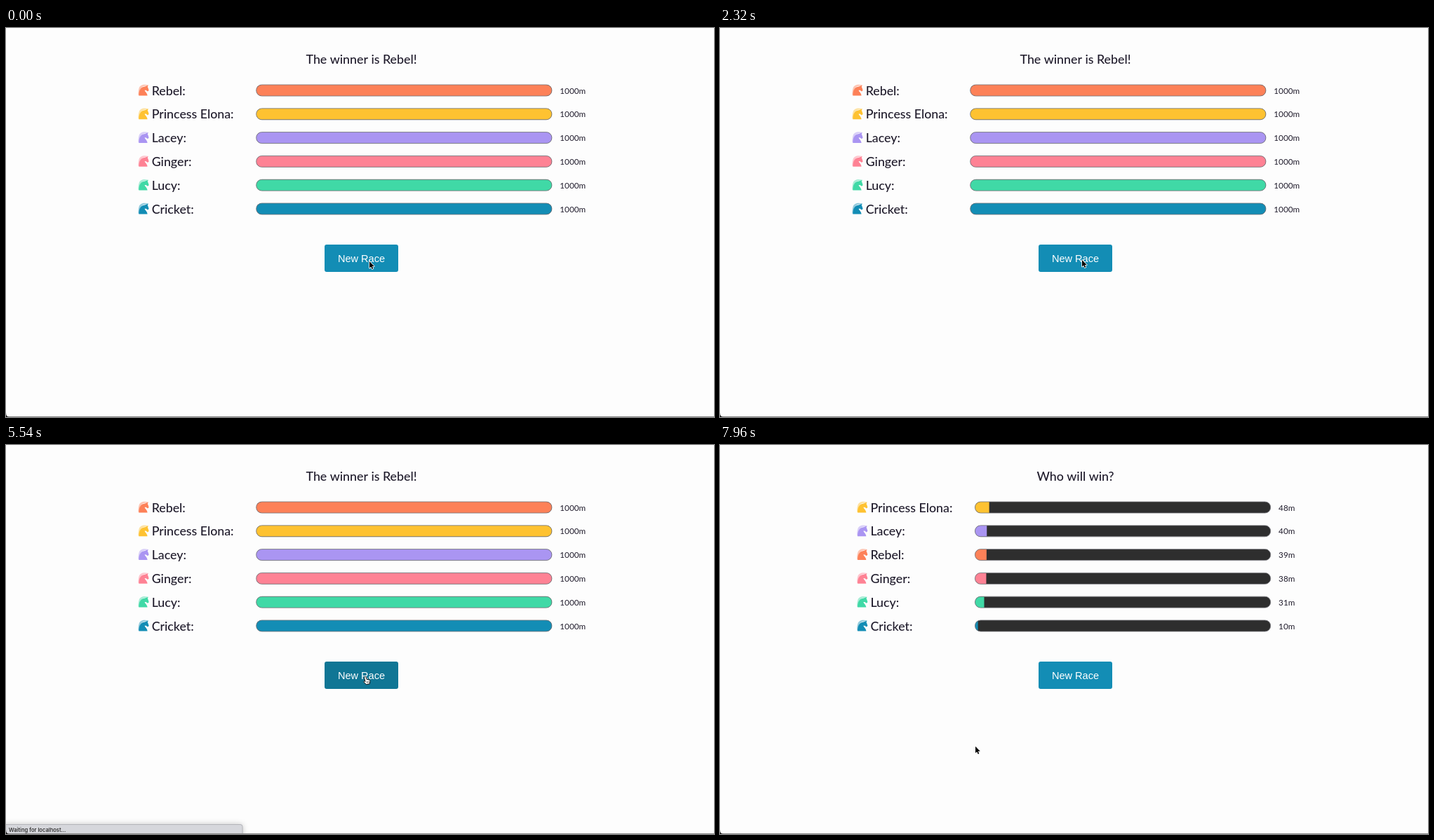
An HTML page with a canvas that plays this animation: 1009x555 px, repeating every 8000 ms.

```html
<!DOCTYPE html>
<html lang="en">
<head>
<meta charset="utf-8">
<title>Horse race</title>
<style>
  html, body { margin: 0; width: 100%; height: 100%; overflow: hidden; background: #fdfdfd; }
  canvas { display: block; }
</style>
</head>
<body>
<canvas id="stage" width="1009" height="555"></canvas>
<script>
const ctx = document.getElementById('stage').getContext('2d');
const LOOP = 8000;
const INK = '#201c2c';
const NAME_FONT = '500 17.8px Lato, sans-serif';
const DIST_FONT = '400 11.7px Lato, sans-serif';
const BUTTON_FONT = '14.5px "Liberation Sans", Arial, sans-serif';
const STATUS_FONT = '500 7.6px Inter, sans-serif';

const TIMES = { hover: 4350, status: 5500, clear: 6000, race: 6500, fade: 6850, leave: 7350 };

const HORSES = {
  'Rebel': '#fd8158',
  'Princess Elona': '#fec231',
  'Lacey': '#aa95f2',
  'Ginger': '#fe8294',
  'Lucy': '#40d9a6',
  'Cricket': '#138db5'
};
const FINISH = Object.keys(HORSES).map(name => [name, 1000]);
const START = [['Princess Elona', 48], ['Lacey', 40], ['Rebel', 39],
               ['Ginger', 38], ['Lucy', 31], ['Cricket', 10]];

// Cursor stops: time, x, y
const PATH = [[0, 518, 333], [300, 516, 331], [4300, 516, 331], [4500, 509, 330],
              [6600, 509, 330], [6900, 507, 333], [7200, 507, 333], [7700, 364, 430]];

const MANE = new Path2D('M15 1C9-1 3 0 1.5 5C.4 8.5 .3 12 .5 15L2.3 15C2 9 4 4 8 2.4Z');
const HEAD = new Path2D('M14.6 .8L13.6 3.2C14.4 4.4 15 6.6 15.5 8.3L13.8 9.9L11.4 8.1' +
  'L9.5 8C10 10.6 13.2 11.7 13.4 15.7L1.2 15.7C1 9 3.4 3.3 9.8 2.7Z');
const ARROW = new Path2D('M0 0L0 9.6L2.2 7.6L3.7 11L5.3 10.3L3.8 7L6.8 7Z');
const HAND = new Path2D('M2 1C3 .1 4 .5 4.3 1.7L5 4.3L8.3 5C9.8 5.3 10 6.2 9.8 7.5' +
  'L9.2 10.8L4.4 11.6L1 8.4C.1 7.4 1.1 6.5 2.2 7.1L3 7.6L1.6 2.4C1.4 1.7 1.5 1.3 2 1Z');
const KNUCKLES = new Path2D('M5 7.2L5.3 9.5M6.6 7.2L6.8 9.4M8.1 7.1L8.1 9.2');

function text(str, x, y, font, color = INK, align = 'left') {
  ctx.font = font;
  ctx.fillStyle = color;
  ctx.textAlign = align;
  ctx.fillText(str, x, y);
}

function roundBox(x, y, w, h, r) {
  ctx.beginPath();
  ctx.roundRect(x, y, w, h, r);
}

function drawIcon(x, y, color) {
  ctx.save();
  ctx.translate(x, y);
  ctx.fillStyle = color;
  ctx.globalAlpha = 0.45;
  ctx.fill(MANE);
  ctx.globalAlpha = 1;
  ctx.fill(HEAD);
  ctx.restore();
}

function drawBar(x, y, w, h, share, color) {
  ctx.save();
  roundBox(x, y, w, h, h / 2);
  ctx.clip();
  ctx.fillStyle = '#2e2e2e';
  ctx.fillRect(x, y, w, h);
  ctx.fillStyle = color;
  ctx.fillRect(x, y, w * share, h);
  ctx.restore();
  roundBox(x, y, w, h, h / 2);
  ctx.strokeStyle = '#727278';
  ctx.lineWidth = 0.8;
  ctx.stroke();
}

function drawRow([name, metres], i) {
  const y = 89 + i * 33.8;
  const label = metres + 'm';
  ctx.font = DIST_FONT;
  // Rows are centred, so a shorter distance moves the whole row right.
  const x = 188 + (37 - ctx.measureText(label).width) / 2;
  drawIcon(x, y - 8.3, HORSES[name]);
  text(name + ':', x + 19.5, y + 6.6, NAME_FONT);
  drawBar(x + 168.5, y - 8, 421.3, 16, metres / 1000, HORSES[name]);
  text(label, x + 601.2, y + 4.5, DIST_FONT);
}

function drawButton(y, hover) {
  roundBox(454, y, 105, 39, 3);
  ctx.fillStyle = hover ? '#107695' : '#138db5';
  ctx.fill();
  text('New Race', 506.5, y + 24.7, BUTTON_FONT, '#fff', 'center');
}

function drawStatus(alpha) {
  if (alpha <= 0) return;
  ctx.save();
  ctx.globalAlpha = alpha;
  ctx.shadowColor = 'rgba(0,0,0,.25)';
  ctx.shadowBlur = 8;
  roundBox(-4, 541.5, 341, 20, 3);
  ctx.fillStyle = '#d6d7dc';
  ctx.fill();
  ctx.shadowColor = 'transparent';
  ctx.strokeStyle = '#b2b3b8';
  ctx.lineWidth = 1;
  ctx.stroke();
  text('Waiting for localhost...', 4, 551.5, STATUS_FONT, '#222');
  ctx.restore();
}

function drawWindowEdge() {
  ctx.fillStyle = '#8b8b8b';
  ctx.fillRect(0, 554, 1009, 1);
  ctx.fillStyle = '#111';
  ctx.fill(new Path2D('M0 549Q0 555 5 555L0 555Z'));
}

function cursorAt(t) {
  const next = PATH.findIndex(p => p[0] > t);
  if (next < 0) return PATH[PATH.length - 1].slice(1);
  const [t0, x0, y0] = PATH[next - 1];
  const [t1, x1, y1] = PATH[next];
  const u = (t - t0) / (t1 - t0);
  const k = u * u * (3 - 2 * u);
  return [x0 + (x1 - x0) * k, y0 + (y1 - y0) * k];
}

function drawCursor(t, hand) {
  ctx.save();
  ctx.translate(...cursorAt(t));
  ctx.lineJoin = 'round';
  if (hand) {
    ctx.lineWidth = 1;
    ctx.fillStyle = '#fff';
    ctx.strokeStyle = '#111';
    ctx.fill(HAND);
    ctx.stroke(HAND);
    ctx.lineWidth = 0.6;
    ctx.stroke(KNUCKLES);
  } else {
    ctx.lineWidth = 1.6;
    ctx.strokeStyle = '#fff';
    ctx.fillStyle = '#000';
    ctx.stroke(ARROW);
    ctx.fill(ARROW);
  }
  ctx.restore();
}

function draw(t) {
  const empty = t >= TIMES.clear && t < TIMES.race;
  const hand = t >= TIMES.hover && t < TIMES.leave;
  ctx.fillStyle = '#fdfdfd';
  ctx.fillRect(0, 0, 1009, 555);
  text(t < TIMES.clear ? 'The winner is Rebel!' : 'Who will win?', 506.5, 51.3, NAME_FONT, INK, 'center');
  if (!empty) (t < TIMES.clear ? FINISH : START).forEach(drawRow);
  drawButton(empty ? 89 : 309, hand && !empty);
  if (t >= TIMES.status) drawStatus(Math.min(1, 1 - (t - TIMES.fade) / 400));
  drawWindowEdge();
  drawCursor(t, hand);
}

function tick(now) {
  draw(now % LOOP);
  requestAnimationFrame(tick);
}
requestAnimationFrame(tick);
</script>
</body>
</html>
```
